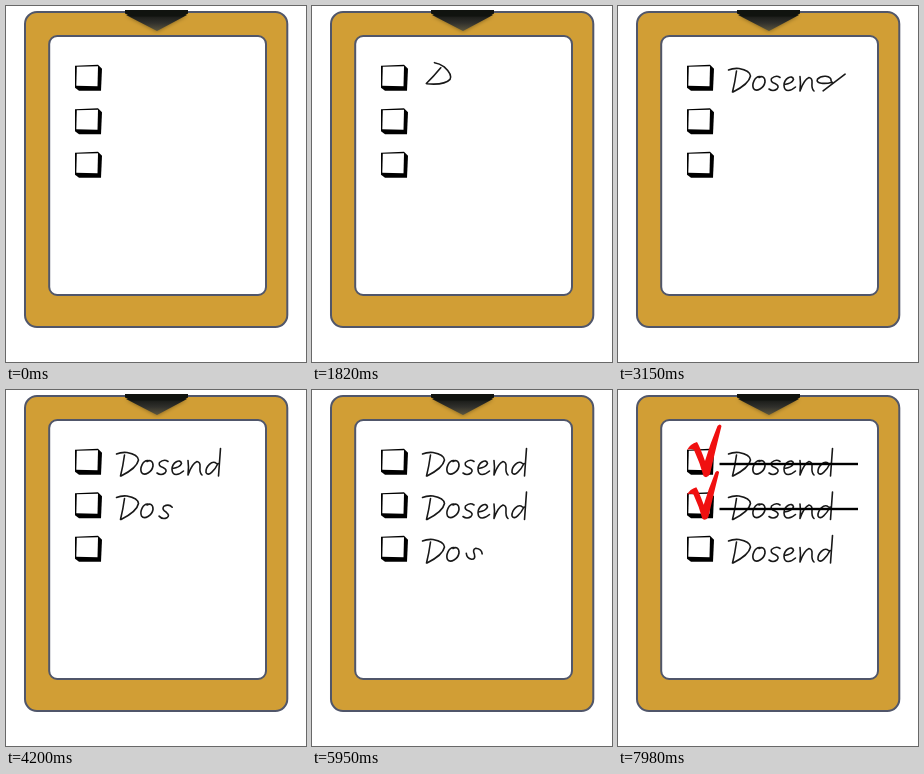
Recreate the animation shown at these times as an HTML page with a canvas. Size 300x356 px, loop 8000 ms.

```html
<!DOCTYPE html>
<html lang="en">
<head>
<meta charset="utf-8">
<title>Checklist</title>
<style>
html, body { margin: 0; width: 100%; height: 100%; overflow: hidden; background: #fff; }
canvas { display: block; width: 300px; height: 356px; }
</style>
</head>
<body>
<canvas id="stage" width="300" height="356" role="img" aria-label="Checklist: Dosend, Dosend, Dosend"></canvas>
<script>
const ctx = document.getElementById('stage').getContext('2d');
const LOOP = 8000, STEP = 70, LETTER = 270;
const ROW_GAP = 43.5;
const ROW_START = [1660, 3465, 5270];

// Handwritten letters, each with the centre it spins around
const LETTERS = [
  { x: 122, y: 74, path: 'M110.5 64 Q115 62 121 62.5 Q132 64.5 132.5 70 Q131 78 115 86 M118.5 65 Q117 76 114.5 86' },
  { x: 141, y: 78, path: 'M142 70.5 C137 70 133.5 78 135.5 82.5 C138.5 86.5 146 82 147 76 C147.3 71 144 69.5 141 71.5' },
  { x: 157, y: 78, path: 'M162 71.5 Q158 68.5 153.5 72.5 Q152 76 157 77.5 Q162 80 159 83 Q155 86 151 83' },
  { x: 171, y: 78, path: 'M166.5 78.5 Q174 77.5 175.5 73.5 C174.5 68 166 72.5 166 79.5 C166.5 87 173 85 177.5 81' },
  { x: 188, y: 78, path: 'M182 70.5 Q183 77 182 85 Q186 73.5 191 71.5 Q194.5 72 194 77 Q193.5 83 196 85' },
  { x: 207, y: 72, path: 'M210.5 73.5 C206 69.5 199.5 77 200 82.5 C202 87.5 209 80 212 73.5 M214.5 58.5 Q213.5 72 212.5 86' }
].map(l => ({ ...l, path: new Path2D(l.path) }));

// Progress, degrees, dx, dy
const SPIN = [
  [0, -90, -8, -40], [0.37, -45, -6, -19], [0.5, 53, 5, 0],
  [0.6, 30, 5, -3], [0.72, 12, 3, 1], [1, 0, 0, 0]
];

const TICK = new Path2D('M69 60 Q72 54 79 52 Q82 57 87 71 Q92 54 99.5 36 Q102 33 103.5 36 Q97 62 92 84 Q89 89 85.5 86 Q82 73 76 60 Q73 58 69 60 Z');

const clamp = v => Math.max(0, Math.min(1, v));

function pose(u) {
  let i = 1;
  while (i < SPIN.length - 1 && u > SPIN[i][0]) i++;
  const a = SPIN[i - 1], b = SPIN[i];
  const k = clamp((u - a[0]) / (b[0] - a[0]));
  return a.map((v, n) => v + (b[n] - v) * k);
}

function panel(x, y, w, h, r, fill) {
  ctx.beginPath();
  ctx.roundRect(x, y, w, h, r);
  ctx.fillStyle = fill;
  ctx.fill();
  ctx.lineWidth = 2;
  ctx.strokeStyle = '#50566a';
  ctx.stroke();
}

function shape(points, fill) {
  ctx.beginPath();
  points.forEach(([x, y]) => ctx.lineTo(x, y));
  ctx.closePath();
  ctx.fillStyle = fill;
  ctx.fill();
}

function board() {
  panel(19, 6, 262.3, 315, 12, '#d19e35');
  panel(43.2, 30, 216.8, 259, 8, '#fff');
  const shade = ctx.createLinearGradient(0, 9, 0, 25);
  shade.addColorStop(0, '#161815');
  shade.addColorStop(0.5, '#30302c');
  shade.addColorStop(1, '#5c563f');
  ctx.save();
  ctx.shadowColor = 'rgba(50,40,10,.6)';
  ctx.shadowBlur = 4;
  shape([[120, 9], [181, 9], [151, 25]], shade);
  ctx.restore();
  shape([[119, 4], [182, 4], [182, 7.5], [177, 10.5], [125, 10.5], [119, 7.5]], '#10130f');
}

function checkbox(y) {
  shape([[69, y + 1], [92, y], [96, y + 4], [95, y + 26], [73, y + 26], [69, y + 23]], '#000');
  shape([[70.8, y + 2], [92, y + 1.5], [91.5, y + 21.5], [70.3, y + 21]], '#fff');
}

function letter(glyph, dy, u) {
  if (u <= 0) return;
  const [, deg, mx, my] = pose(clamp(u));
  ctx.save();
  ctx.globalAlpha = clamp(u / 0.3);
  ctx.translate(glyph.x + mx, glyph.y + my + dy);
  ctx.rotate(deg * Math.PI / 180);
  ctx.translate(-glyph.x, -glyph.y);
  ctx.lineWidth = 1.6;
  ctx.lineCap = ctx.lineJoin = 'round';
  ctx.strokeStyle = '#181818';
  ctx.stroke(glyph.path);
  ctx.restore();
}

function tick(dy, scale, u) {
  if (u <= 0) return;
  ctx.save();
  ctx.beginPath();
  ctx.rect(66, 0, 40 * clamp(u), 356);
  ctx.clip();
  ctx.translate(69, 33 + dy);
  ctx.scale(scale, scale);
  ctx.translate(-69, -33);
  ctx.fillStyle = '#f01010';
  ctx.fill(TICK);
  ctx.restore();
}

function strike(y, u) {
  if (u <= 0) return;
  ctx.fillStyle = '#000';
  ctx.fillRect(101.5, y, 138.5 * clamp(u), 2.4);
}

function draw(time) {
  const t = Math.floor(time / STEP) * STEP;
  ctx.fillStyle = '#fff';
  ctx.fillRect(0, 0, 300, 356);
  board();
  ROW_START.forEach((start, row) => {
    const dy = row * ROW_GAP;
    checkbox(58.8 + dy);
    LETTERS.forEach((glyph, i) => letter(glyph, dy, (t - start - i * LETTER) / LETTER));
  });
  tick(0, 1, (t - 6930) / 250);
  strike(72.8, (t - 7180) / 250);
  tick(46.5, 0.93, (t - 7430) / 250);
  strike(117.8, (t - 7680) / 250);
}

const begin = performance.now();
function frame() {
  draw((performance.now() - begin) % LOOP);
  requestAnimationFrame(frame);
}
frame();
</script>
</body>
</html>
```
